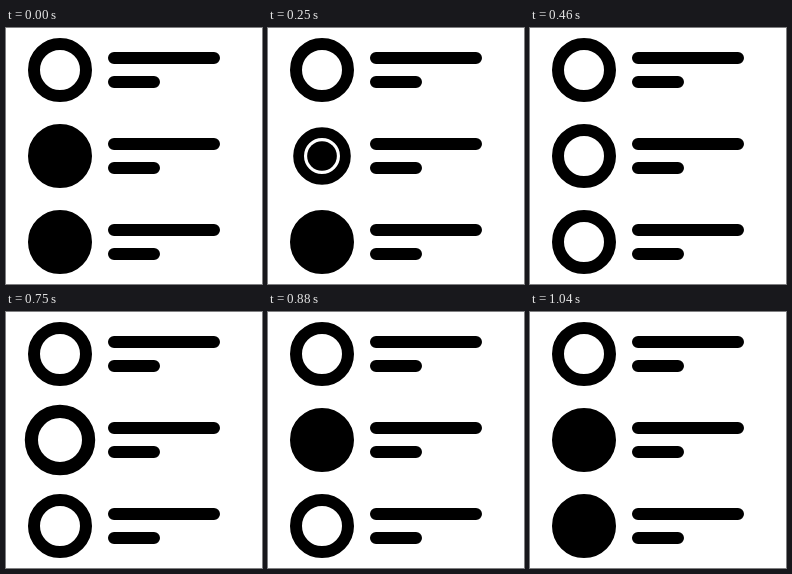
Animation of 256x256 px, one loop 1180 ms. Source, as an HTML page:

```html
<!DOCTYPE html>
<html lang="en">
<head>
<meta charset="utf-8">
<title>Radio list</title>
<style>
html, body { margin: 0; height: 100%; overflow: hidden; background: #fff; }
svg { display: block; width: 100vw; height: 100vh; }
</style>
</head>
<body>
<svg viewBox="0 0 256 256">
  <defs>
    <path id="lines" d="M108 30H208M108 54H148" stroke="#000" stroke-width="12" stroke-linecap="round"/>
    <circle id="ring" r="26" fill="none" stroke="#000" stroke-width="12"/>
  </defs>
  <use href="#lines"/>
  <use href="#lines" y="86"/>
  <use href="#lines" y="172"/>
  <use href="#ring" x="54" y="42"/>
  <g class="radio"><use href="#ring"/><circle class="dot"/></g>
  <g class="radio"><use href="#ring"/><circle class="dot"/></g>
</svg>
<script>
const LOOP = 1180, FPS = 24;
const FULL = 26, PART = 16.5, EMPTY = 0;

// Each pose is [scale, dot radius]; poses last one tick, the last one stays.
const UNCHECK = [[0.9, FULL], [0.8, FULL], [0.9, PART], [1, EMPTY]];
const CHECK = [[1.1, EMPTY], [1.2, EMPTY], [1.1, PART], [1, FULL]];
const UNCHECK_TICK = 4, CHECK_TICK = 18;

const radios = [...document.querySelectorAll('.radio')];

// Ticks run at 24 per second, rounded to the nearest 10 ms.
function tickAt(ms) {
  return Math.floor((Math.floor(ms / 10) * 10 + 4.99) * FPS / 1000);
}

function poseAt(tick, delay) {
  const off = tick - UNCHECK_TICK - delay;
  const on = tick - CHECK_TICK - delay;
  if (on >= 0) return CHECK[Math.min(on, 3)];
  if (off >= 0) return UNCHECK[Math.min(off, 3)];
  return [1, FULL];
}

const start = performance.now();

function draw() {
  const tick = tickAt((performance.now() - start) % LOOP);
  radios.forEach((radio, i) => {
    const [scale, dot] = poseAt(tick, i * 4);
    radio.setAttribute('transform', `translate(54 ${128 + i * 86}) scale(${scale})`);
    radio.querySelector('.dot').setAttribute('r', dot);
  });
  requestAnimationFrame(draw);
}
draw();
</script>
</body>
</html>
```
